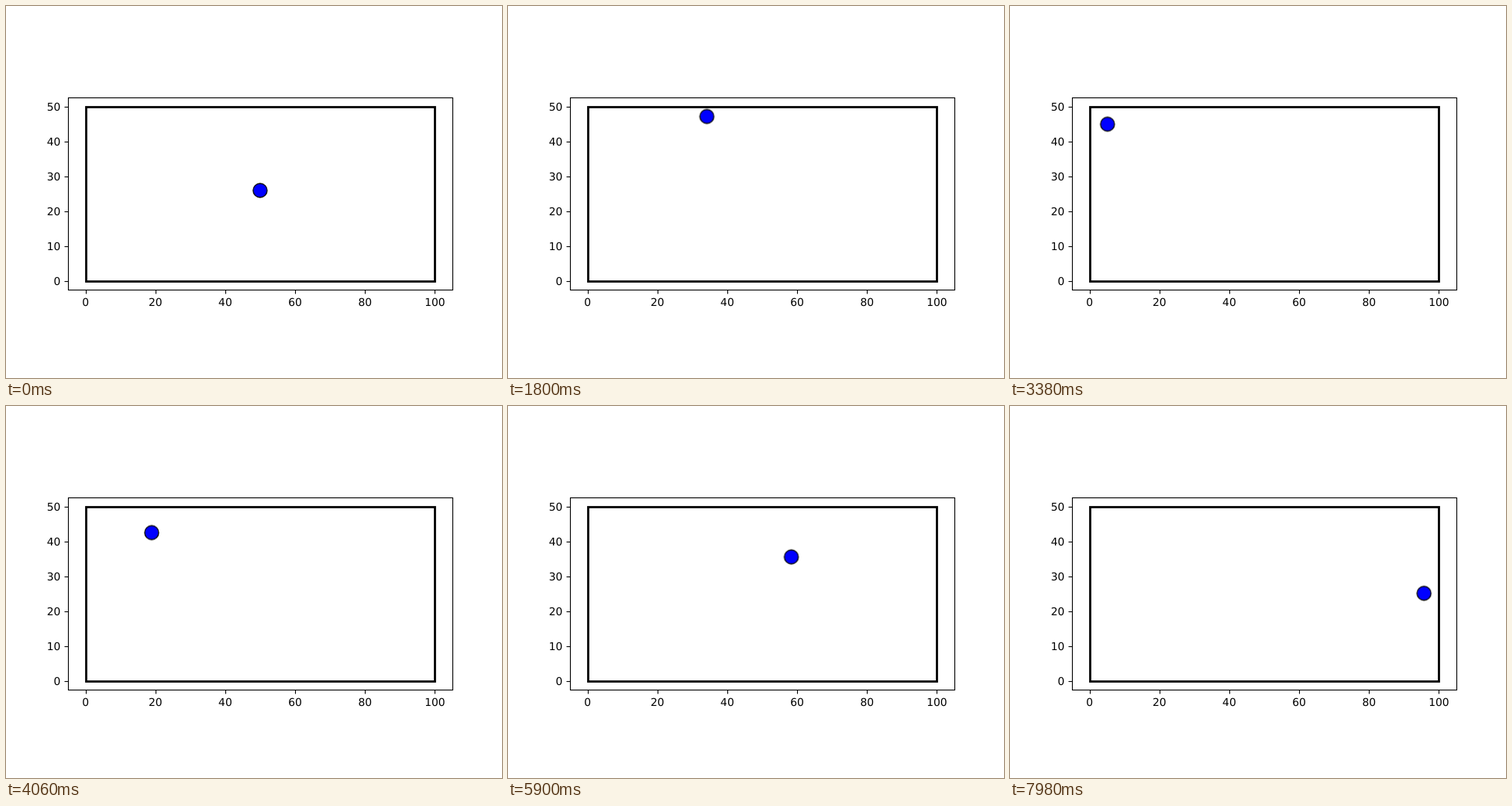
Animation of 640 by 480 pixels, one loop 8 s. Source, as an HTML page:

```html
<!DOCTYPE html>
<html lang="en">
<head>
<meta charset="utf-8">
<title>Bouncing ball</title>
<style>
  html, body { margin: 0; width: 100%; height: 100%; overflow: hidden; background: #fff; }
  svg { display: block; width: 640px; height: 480px; }
  text { font: 13.889px "DejaVu Sans", sans-serif; text-rendering: geometricPrecision; }
  .thin { fill: none; stroke: #000; stroke-width: 1.11; }
  .wall { fill: none; stroke: #000; stroke-width: 2.78; }
  #ball { fill: #00f; stroke: #000; stroke-width: 1.39; }
</style>
</head>
<body>
<svg id="stage" viewBox="0 0 640 480">
  <rect class="thin" x="80.5" y="118.5" width="496" height="248"/>
  <rect class="wall" x="103.5" y="130.5" width="450" height="225"/>
  <circle id="ball" r="9.018"/>
</svg>
<script>
  const SCALE = 496 / 110;
  const LOOP = 8000;
  const toX = x => 80 + (x + 5) * SCALE;
  const toY = y => 366.4 - (y + 2.5) * SCALE;
  const snap = v => Math.round(v) + 0.5;

  const stage = document.getElementById('stage');
  const ball = document.getElementById('ball');

  function add(tag, attrs, text = '') {
    const node = document.createElementNS(stage.namespaceURI, tag);
    for (const [key, value] of Object.entries(attrs)) node.setAttribute(key, value);
    node.textContent = text;
    stage.insertBefore(node, ball);
  }

  for (let x = 0; x <= 100; x += 20) {
    add('path', { class: 'thin', d: `M${snap(toX(x))} 366.5v5` });
    add('text', { x: toX(x), y: 387, 'text-anchor': 'middle' }, x);
  }
  for (let y = 0; y <= 50; y += 10) {
    add('path', { class: 'thin', d: `M80.5 ${snap(toY(y))}h-5` });
    add('text', { x: 70.3, y: Math.round(toY(y) + 5.2), 'text-anchor': 'end' }, y);
  }

  // Steps spent on each heading (degrees), one unit of travel per step.
  const legs = [[22, 89.57], [48, 183], [97, -10], [4, 240]];
  const path = [[49.97, 25.98]];
  for (const [steps, degrees] of legs) {
    const angle = degrees * Math.PI / 180;
    for (let i = 0; i < steps; i++) {
      const [x, y] = path[path.length - 1];
      path.push([x + Math.cos(angle), y + Math.sin(angle)]);
    }
  }

  // Poses are held for 20, 100 and 20 ms in turn.
  const startOf = step => Math.floor(step / 3) * 140 + [0, 20, 120][step % 3];
  const place = ([x, y]) => `translate(${toX(x)}px, ${toY(y)}px)`;
  const keys = path.map((point, step) => ({
    offset: startOf(step) / LOOP,
    transform: place(point),
    easing: 'steps(1, end)'
  }));
  keys.push({ offset: 1, transform: place(path[path.length - 1]) });
  ball.animate(keys, { duration: LOOP, iterations: Infinity });
</script>
</body>
</html>
```
